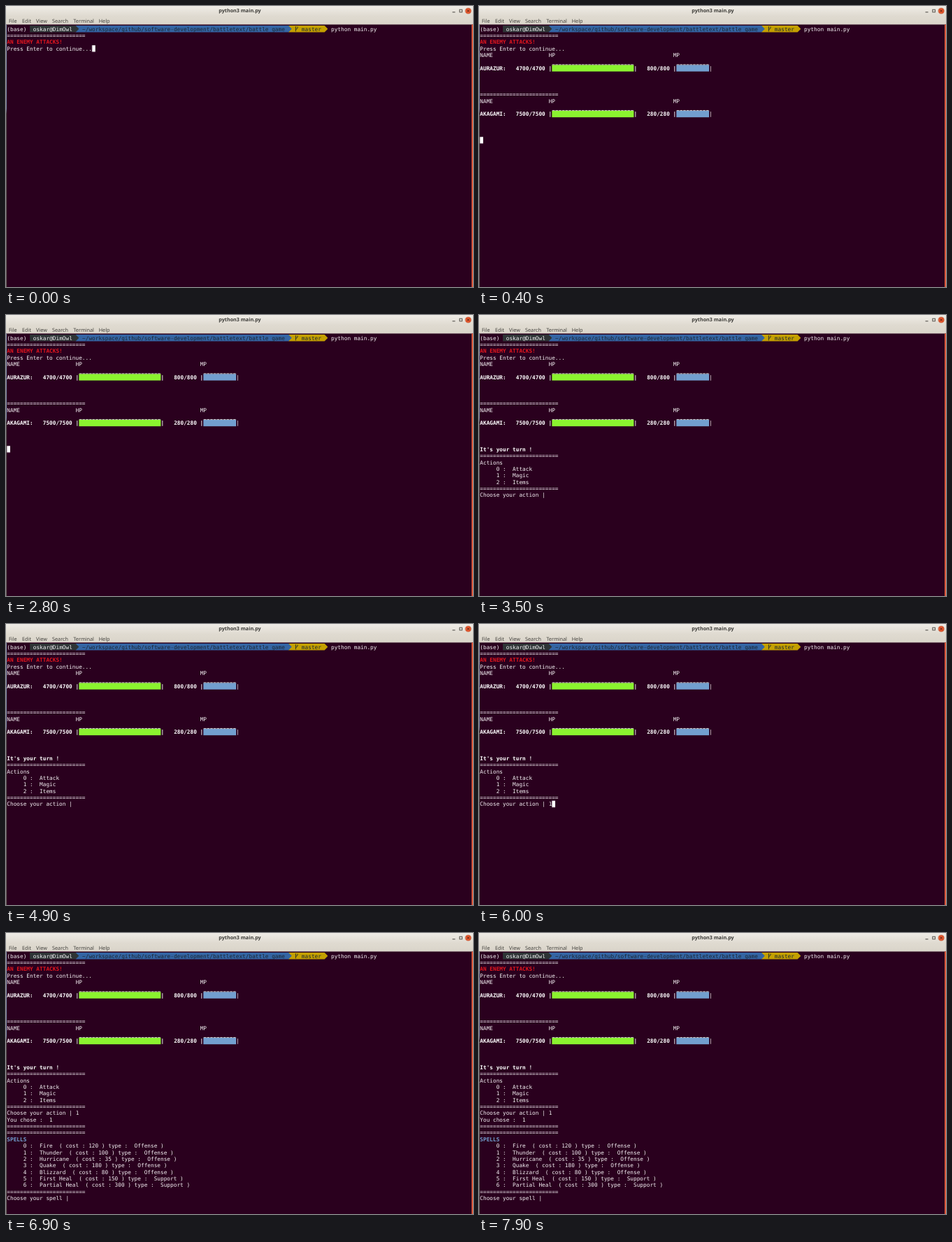
These frames come from a looping animation (668x402 px, 8 s). An HTML page:

```html
<!DOCTYPE html>
<html lang="en">
<head>
<meta charset="utf-8">
<title>python3 main.py</title>
<style>
  html, body { margin: 0; width: 100%; height: 100%; overflow: hidden; background: #2a001e; }
  svg { display: block; width: 668px; height: 402px; }
  text { white-space: pre; text-rendering: geometricPrecision; }
  /* the tiny turn keeps text baselines on fractional pixels */
  #term text { font: 7.78px "DejaVu Sans Mono", monospace; fill: #f4f1f3; transform: rotate(.003deg); }
  #term .b { font-weight: bold; fill: #fff; }
  #term .red { font-weight: bold; fill: #e5161f; }
  #term .blue { font-weight: bold; fill: #729fcf; }
  #term .dark { fill: #1c2632; }
  #bar text { font: 7.3px "Open Sans", "Noto Sans", sans-serif; fill: #3c3b37; }
  #bar .title { font-weight: bold; font-size: 7.2px; text-anchor: middle; }

  .step { opacity: 0; animation: 8s step-end infinite; }
  #status { animation-name: status; }
  #turn { animation-name: turn; }
  #typed { animation-name: typed; }
  #spells { animation-name: spells; }
  @keyframes status { 0% { opacity: 0 } 5%, 100% { opacity: 1 } }
  @keyframes turn { 0% { opacity: 0 } 43.75%, 100% { opacity: 1 } }
  @keyframes typed { 0% { opacity: 0 } 68.75%, 100% { opacity: 1 } }
  @keyframes spells { 0% { opacity: 0 } 76.25%, 100% { opacity: 1 } }

  /* cursor cell: 4.684 x 9.365 px */
  #cursor { fill: #fff; animation: place 8s step-end infinite, blink 8s step-end infinite; }
  @keyframes place {
    0% { transform: translate(121.78px, 28.1px) }
    5% { transform: translate(0, 159.2px) }
    43.75% { transform: translate(98.36px, 224.76px) }
    68.75% { transform: translate(103.05px, 224.76px) }
    76.25%, 100% { transform: translate(93.68px, 346.5px) }
  }
  @keyframes blink {
    0%, 20%, 35%, 50%, 65%, 91.25% { opacity: 1 }
    12.5%, 27.5%, 42.5%, 57.5%, 83.75%, 98.75%, 100% { opacity: 0 }
  }
</style>
</head>
<body>
<svg viewBox="0 0 668 402">
  <defs>
    <linearGradient id="chrome" x2="0" y2="1">
      <stop stop-color="#efece6"/><stop offset=".55" stop-color="#dfdad0"/><stop offset="1" stop-color="#dad5ca"/>
    </linearGradient>
    <linearGradient id="edge" x2="0" y2="1">
      <stop stop-color="#8796b2"/><stop offset=".32" stop-color="#7686a6"/>
      <stop offset=".34" stop-color="#55504f"/><stop offset="1" stop-color="#6a645f"/>
    </linearGradient>
  </defs>
  <rect width="668" height="402" fill="#2a001e"/>
  <g id="bar">
    <rect width="668" height="26.5" fill="url(#chrome)"/>
    <text class="title" x="334.5" y="9.4">python3 main.py</text>
    <text x="4" y="23.6">File</text>
    <text x="23" y="23.6">Edit</text>
    <text x="43" y="23.6">View</text>
    <text x="66" y="23.6">Search</text>
    <text x="96.3" y="23.6">Terminal</text>
    <text x="132.7" y="23.6">Help</text>
    <path d="M638.5 8.8h4" stroke="#55524c" stroke-width="1.1"/>
    <rect x="648.8" y="5.2" width="3.6" height="3.6" fill="none" stroke="#55524c"/>
    <circle cx="661.2" cy="7" r="4.1" fill="#e4572e" stroke="#b5522f" stroke-width=".5"/>
    <path d="M659.7 5.5l3 3m0-3l-3 3" stroke="#5a2515" stroke-width=".9"/>
  </g>
  <rect y="26.5" width="1" height="376" fill="url(#edge)"/>
  <rect x="666" y="26.5" width="2" height="376" fill="#db5a3c"/>
  <g id="term">
    <g id="intro"></g>
    <g id="status" class="step"></g>
    <g id="turn" class="step"></g>
    <g id="typed" class="step"></g>
    <g id="spells" class="step"></g>
    <rect id="cursor" x="1.3" y="28.1" width="4.7" height="9.3"/>
  </g>
</svg>
<script>
  const CW = 4.684, RH = 9.365, X0 = 1.3, Y0 = 28.1;
  const RULE = '='.repeat(24);
  const colX = c => X0 + c * CW;
  const rowY = r => Y0 + r * RH;

  function add(group, tag, attrs, content = '') {
    const el = document.createElementNS('http://www.w3.org/2000/svg', tag);
    for (const k in attrs) el.setAttribute(k, attrs[k]);
    el.textContent = content;
    document.getElementById(group).append(el);
  }
  const print = (group, row, col, str, cls = '') =>
    add(group, 'text', { x: colX(col), y: rowY(row) + 7.5, class: cls }, str);
  const block = (group, row, col, len, fill) =>
    add(group, 'rect', { x: colX(col), y: rowY(row), width: len * CW, height: RH, fill });
  const lines = (group, row, list) => list.forEach((s, i) => print(group, row + i, 0, s));

  // Prompt segment ending in an arrow
  function segment(col, len, fill) {
    const x = colX(col), e = colX(col + len), y = rowY(0), h = RH / 2;
    add('intro', 'path', { d: `M${x} ${y}H${e}l${CW} ${h}l${-CW} ${h}H${x}z`, fill });
  }
  segment(86, 11, '#c4a000');
  segment(21, 65, '#3465a4');
  segment(7, 14, '#2e3436');
  print('intro', 0, 0, '(base)');
  print('intro', 0, 8, 'oskar@DimOwl');
  print('intro', 0, 23, '~/workspace/github/software-development/battletext/battle_game', 'dark');
  add('intro', 'path', { d: 'M414.4 29.2v7.2M417 29.6v1.6q0 1.6-2.6 2.4', fill: 'none', stroke: '#1c2632', 'stroke-width': .9 });
  print('intro', 0, 90, 'master', 'dark');
  print('intro', 0, 99, 'python main.py');
  print('intro', 1, 0, RULE);
  print('intro', 2, 0, 'AN ENEMY ATTACKS!', 'red');
  print('intro', 3, 0, 'Press Enter to continue...');

  // Bar of solid cells under a row of underscores
  function gauge(row, col, len, fill) {
    block('status', row, col, len, fill);
    add('status', 'path', {
      d: `M${colX(col) + .4} ${rowY(row) - .4}h${len * CW - .8}`,
      stroke: '#e4e6e0', 'stroke-width': .9, 'stroke-dasharray': `3.7 ${CW - 3.7}`
    });
  }
  function fighter(row, name, hp, mp) {
    const bar = row + 2;
    print('status', row, 0, 'NAME');
    print('status', row, 21, 'HP');
    print('status', row, 59, 'MP');
    print('status', bar, 0, `${name}:   ${hp}/${hp} |`, 'b');
    gauge(bar, 22, 25, '#8bf32f');
    print('status', bar, 47, `|   ${mp}/${mp} |`, 'b');
    gauge(bar, 60, 10, '#729fcf');
    print('status', bar, 70, '|');
  }
  fighter(4, 'AURAZUR', 4700, 800);
  print('status', 10, 0, RULE);
  fighter(11, 'AKAGAMI', 7500, 280);

  const item = (s, i) => `     ${i} :  ${s}`;
  print('turn', 17, 0, "It's your turn !", 'b');
  lines('turn', 18, [RULE, 'Actions', ...['Attack', 'Magic', 'Items'].map(item), RULE, 'Choose your action |']);
  print('typed', 24, 21, '1');

  const magic = [
    ['Fire', 120], ['Thunder', 100], ['Hurricane', 35], ['Quake', 180],
    ['Blizzard', 80], ['First Heal', 150], ['Partial Heal', 300]
  ].map(([name, cost], i) =>
    item(`${name}  ( cost : ${cost} ) type :  ${i < 5 ? 'Offense' : 'Support'} )`, i));
  lines('spells', 25, ['You chose :  1', RULE, RULE]);
  print('spells', 28, 0, 'SPELLS', 'blue');
  lines('spells', 29, [...magic, RULE, 'Choose your spell |']);
</script>
</body>
</html>
```
